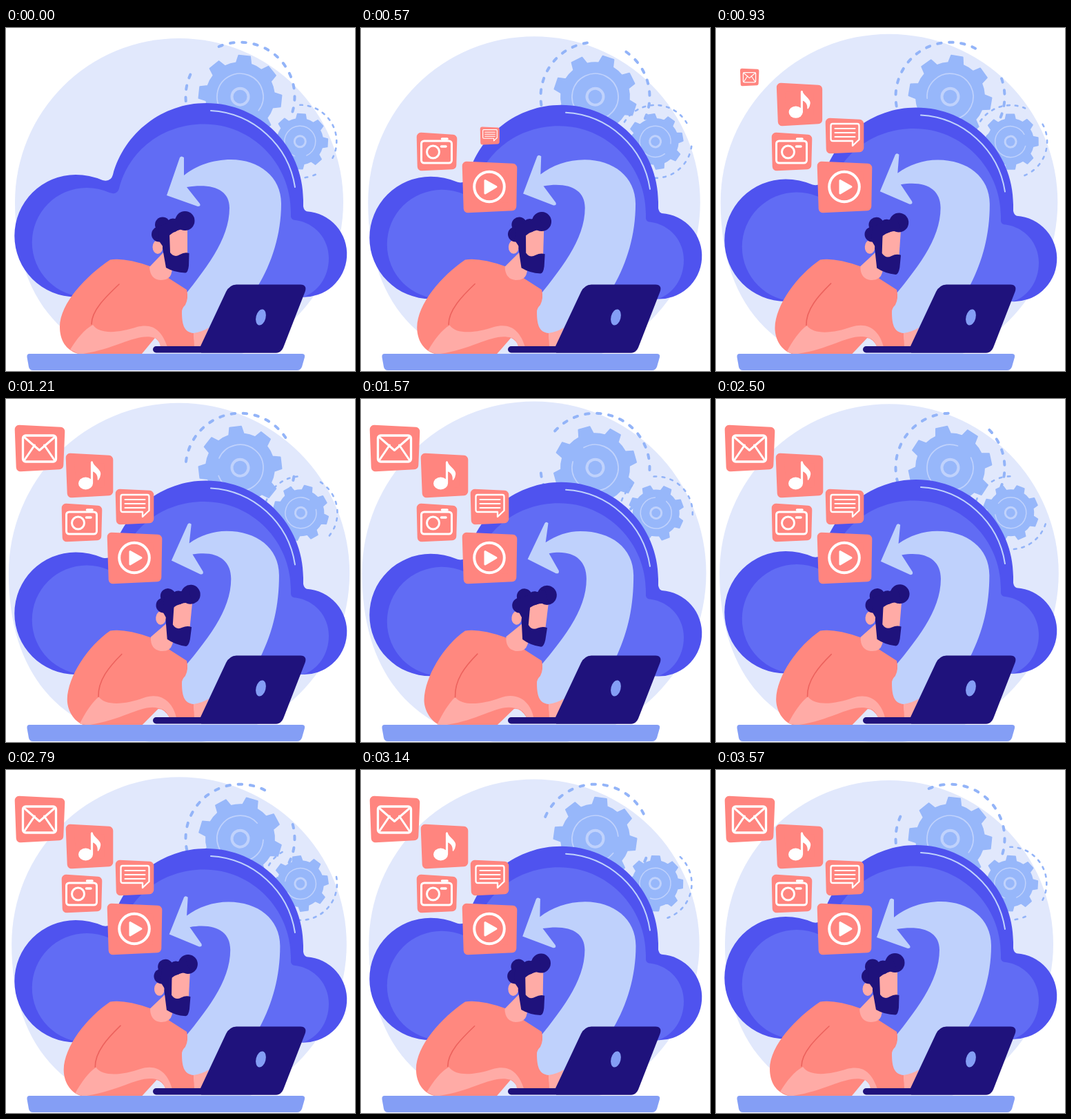
These frames come from a looping animation (506x498 px, 3.64 s). An HTML page:

```html
<!DOCTYPE html>
<html lang="en">
<head>
<meta charset="utf-8">
<title>Cloud upload</title>
<style>
  html, body { margin: 0; width: 100%; height: 100%; overflow: hidden; background: #fff; }
  svg { display: block; width: 506px; height: 498px; }
  .line { fill: none; stroke-linecap: round; stroke-linejoin: round; }
  .dash { stroke: #93b4f8; }
  .gear { fill: #97b7fa; stroke: #97b7fa; stroke-width: 2; stroke-linejoin: round; }
  .shine { stroke: #c0d2fc; }
  .navy { fill: #1f127c; }
  .skin { fill: #ffaba6; }
  .coral { fill: #ff887f; }
  .pale { fill: #bfd1fc; }
  .icon { fill: none; stroke: #fff; stroke-linecap: round; stroke-linejoin: round; }
  .tile { fill: #ff857f; stroke: #ff857f; stroke-width: 12.6; }
  .solid { fill: #fff; }
</style>
</head>
<body>
<svg viewBox="0 0 506 498">
  <path id="disc" fill="#e1e8fc" d="M-238 0A238 238 0 0 1 238 0A238 238 0 0 1 0 238C-153 238 -238 153 -238 0Z"/>
  <g id="gears"></g>

  <g id="cloud">
    <path fill="#4f53ef" d="M101 390.500A88.700 88.700 0 0 1 101 213Q121 213 140 221Q152 224 155 213C171.600 152 227 109 290 109C368 109 431 172 431 250V259Q432 265 436 266.200A62.200 62.200 0 0 1 428 390.500Z"/>
    <path fill="#616cf4" d="M117 390.500A79 79 0 0 1 117 232Q134 232 150 239Q161 243 164 233C178 178 227 139.500 287 139.500C357 139.500 413 197 413 267V274Q414 279 420 279C448 283 468 306 468 334C468 362 452 383 431 390.500Z"/>
    <path class="line shine" stroke-width="2" d="M297 120A131 131 0 0 1 419 231"/>
  </g>

  <path id="arrow" class="pale"/>

  <path id="body" class="coral"/>
  <path id="gap" fill="#e1e8fc"/>
  <path id="sleeve" class="skin"/>
  <path id="fold" class="line" stroke="#ec625d" stroke-width="1.600"/>
  <path class="skin" d="M272 443Q285 441 294 435L283 463H273Z"/>

  <g id="head">
    <path class="skin" d="M228 326L208 347Q209 365 224 366Q238 366 240 355L244 338Z"/>
    <path class="skin" d="M234 292H263V331L238 336Z"/>
    <ellipse class="skin" cx="220" cy="318" rx="7.500" ry="10"/>
    <path class="navy" d="M227 298L237 298L238 326Q244 334 252 329Q259 325 265.500 327L265 345Q264 355 260 355.500Q244 355 232 348L227 320Z"/>
    <g class="navy">
      <circle cx="259.500" cy="280" r="14"/>
      <circle cx="242" cy="286.500" r="10"/>
      <circle cx="227" cy="285.500" r="11"/>
      <circle cx="222" cy="299.500" r="11"/>
      <path d="M222 288L255 272L264 293Q250 290 237 301L236 320L228 318L221 308Z"/>
    </g>
  </g>

  <rect class="navy" x="213" y="462" width="185" height="9.500" rx="4.700"/>
  <path class="navy" d="M334 372.500H427Q437 373 433.500 383L402 464Q399 471.500 391 471.500H283L282 462L319 383Q324 373 334 372.500Z"/>
  <ellipse cx="369.500" cy="420" rx="7" ry="11.800" fill="#849ef5" transform="rotate(14 369.500 420)"/>
  <path fill="#849ef5" d="M34 473H429Q434 473 433 478L429 492Q427 497 422 497H39Q34 497 33 492L30.500 478Q30 473 34 473Z"/>

  <g class="icon" data-x="186.500" data-y="231">
    <path class="tile" d="M153 200L220 203L219 259L155 262Z"/>
    <circle cx="186" cy="230.500" r="21.800" stroke-width="4"/>
    <path class="solid" stroke-width="3" d="M180 221.500L196 230.500L180 240Z"/>
  </g>
  <g class="icon" data-x="110" data-y="179.500">
    <path class="tile" d="M87 158L133 161L132 199L88 201Z"/>
    <rect x="87.500" y="164" width="44" height="32" rx="4" stroke-width="3"/>
    <circle cx="104.500" cy="180" r="9" stroke-width="3"/>
    <path stroke-width="3.500" d="M116.500 172H123M117.500 161H125"/>
  </g>
  <g class="icon" data-x="187" data-y="156.500">
    <path class="tile" d="M165 137L208 139L208 174L166 176Z"/>
    <path stroke-width="2.300" d="M169 139H205Q207.500 139 207.500 142V162L198 171V164H169Q166.500 164 166.500 161V142Q166.500 139 169 139Z"/>
    <path stroke-width="2" d="M172.500 146H201.500M172.500 152H201.500M172.500 158H201.500"/>
  </g>
  <g class="icon" data-x="121" data-y="111">
    <path class="tile" d="M93 85L149 88L149 134L95 137Z"/>
    <ellipse class="solid" stroke="none" cx="115.500" cy="122.500" rx="10.500" ry="9"/>
    <path stroke-width="3.200" d="M124.500 122V92"/>
    <path class="solid" stroke-width="1.500" d="M124.500 91C127 99 137 102 136.500 109Q136 114 133.500 117C134 109 129 105 124.500 104Z"/>
  </g>
  <g class="icon" data-x="48.500" data-y="71.500">
    <path class="tile" d="M19 44L79 47L77 96L21 99Z"/>
    <rect x="24.500" y="53" width="48" height="38" rx="4" stroke-width="3.300"/>
    <path stroke-width="3" d="M26 55L48.500 74.500L71 55M26.500 89L41.500 67M70.500 89L55.500 67"/>
  </g>
</svg>

<script>
const FPS = 14, LOOP = 3640, LAST = 50;
const POP = 340, STAGGER = 200;
const $ = id => document.getElementById(id);
const set = (el, name, value) => el.setAttribute(name, value);

// Angles are in degrees, clockwise from the top.
const polar = (r, a) => {
  const t = a * Math.PI / 180;
  return (r * Math.sin(t)).toFixed(2) + ' ' + (-r * Math.cos(t)).toFixed(2);
};
const arc = (r, a, b) => `M${polar(r, a)}A${r} ${r} 0 ${b - a > 180 ? 1 : 0} 1 ${polar(r, b)}`;

function dashes(r, a, b, count, width) {
  const len = r * (b - a) * Math.PI / 180, on = r * 0.07;
  const off = (len - on) / (count - 1) - on;
  return `<path class="line dash" stroke-width="${width}" stroke-dasharray="${on} ${off}" d="${arc(r, a, b)}"/>`;
}

function cog(R, root, phase) {
  let d = '';
  for (let i = 0; i < 8; i++) {
    const a = phase + i * 45;
    d += `${i ? `A${root} ${root} 0 0 1 ` : 'M'}${polar(root, a - 12.5)}L${polar(R, a - 8)}L${polar(R, a + 8)}L${polar(root, a + 12.5)}`;
  }
  return `<path class="gear" d="${d}A${root} ${root} 0 0 1 ${polar(root, phase - 12.5)}Z"/>`;
}

const shine = (d, width) => `<path class="line shine" stroke-width="${width}" d="${d}"/>`;
const ring = (r, width) => `<circle class="line shine" r="${r}" stroke-width="${width}"/>`;

$('gears').innerHTML =
  `<g id="big">${dashes(79, -23, 106, 11, 4)}${dashes(79, 154, 294, 12, 4)}
   ${cog(60, 49.5, 6)}${shine(arc(33.5, 172, 487), 1.7)}${ring(12, 4)}</g>
   <g id="small">${dashes(53, 0, 117, 10, 2.6)}${dashes(53, 155, 251, 8, 2.6)}
   ${cog(40, 33, 3)}${shine(arc(22.5, 200, 515), 1.5)}${ring(8, 3)}</g>`;

// Each pair holds the two ends of the sway.
const morphs = {
  arrow: [
    'M233 243L252 188Q254 185 258 188L258 214C275 200 300 191 326 191C367 191 399 216 399 255C399 300 385 342 365 375L340 450L250 450L250 400C289 350 324 308 324 261C324 235 300 225 262 231L281 255Q283 259 278 259Z',
    'M242 232L267 180Q269 177 272 180L268 208C283 198 300 192 318 192C362 192 395 216 395 256C395 300 388 335 371 373L340 450L250 450L250 400C292 350 327 308 327 261C327 232 306 218 273 224L287 249Q288 254 283 253Z'],
  body: [
    'M151 336.500Q172 333 209 346L262 380Q265 392 260 402Q255 407 255 412C255 430 258 442 272 443L274 465L215 465L200 473L105 473C86 468 78 452 78 434C78 400 116 360 151 336.500Z',
    'M151 336.500Q172 333 209 346L262 380Q265 392 260 402Q255 407 255 412C255 430 258 442 272 443L274 465L215 465L200 473L114 473C102 468 92 452 92 437C93 403 120 358 151 336.500Z'],
  gap: [
    'M197 473L216 450Q222 454 226 463L213 473Z',
    'M198 473L222 450Q232 448 241 463L213 473Z'],
  sleeve: [
    'M93 467C102 452 114 437 126 431C136 446 166 442 190 434C214 428 226 440 234 463L224 463Q222 452 216 450C190 442 163 465 112 473L105 473Z',
    'M111 473C118 458 128 441 137 433C148 447 178 443 202 434C228 424 247 440 251 463L241 463Q236 450 224 449C200 442 176 465 125 473L118 473Z'],
  fold: [
    'M164 372C145 390 124 410 124 430',
    'M169 370C151 388 136 408 137 433']
};

const numbers = /-?[\d.]+/g;
function blend([from, to], p) {
  const ends = to.match(numbers);
  let i = 0;
  return from.replace(numbers, n => (+n + (ends[i++] - n) * p).toFixed(2));
}

const icons = [...document.querySelectorAll('.icon')];

function draw(ms) {
  const step = Math.min(LAST, Math.floor((ms + 5) * FPS / 1000));
  const turn = step / LAST, time = step * 1000 / FPS;
  const sway = (1 - Math.cos(2 * Math.PI * turn)) / 2;

  set($('disc'), 'transform', `translate(251 253) scale(${1 + 0.05 * sway})`);
  set($('cloud'), 'transform', `translate(0 ${12.3 * sway})`);
  set($('head'), 'transform', `rotate(${7.3 * sway} 225 366)`);
  set($('big'), 'transform', `translate(339.5 99.7) rotate(${360 * turn})`);
  set($('small'), 'transform', `translate(${426.3 + 1.5 * sway} ${164.7 + 0.8 * sway}) rotate(${-360 * turn})`);
  for (const id in morphs) set($(id), 'd', blend(morphs[id], sway));

  icons.forEach((icon, i) => {
    const k = Math.max(0, Math.min(1, (time - i * STAGGER) / POP));
    const { x, y } = icon.dataset;
    icon.style.display = k ? '' : 'none';
    set(icon, 'transform', `translate(${x} ${y}) scale(${k}) translate(${-x} ${-y})`);
  });
}

const start = performance.now();
function tick() {
  draw((performance.now() - start) % LOOP);
  requestAnimationFrame(tick);
}
tick();
</script>
</body>
</html>
```
